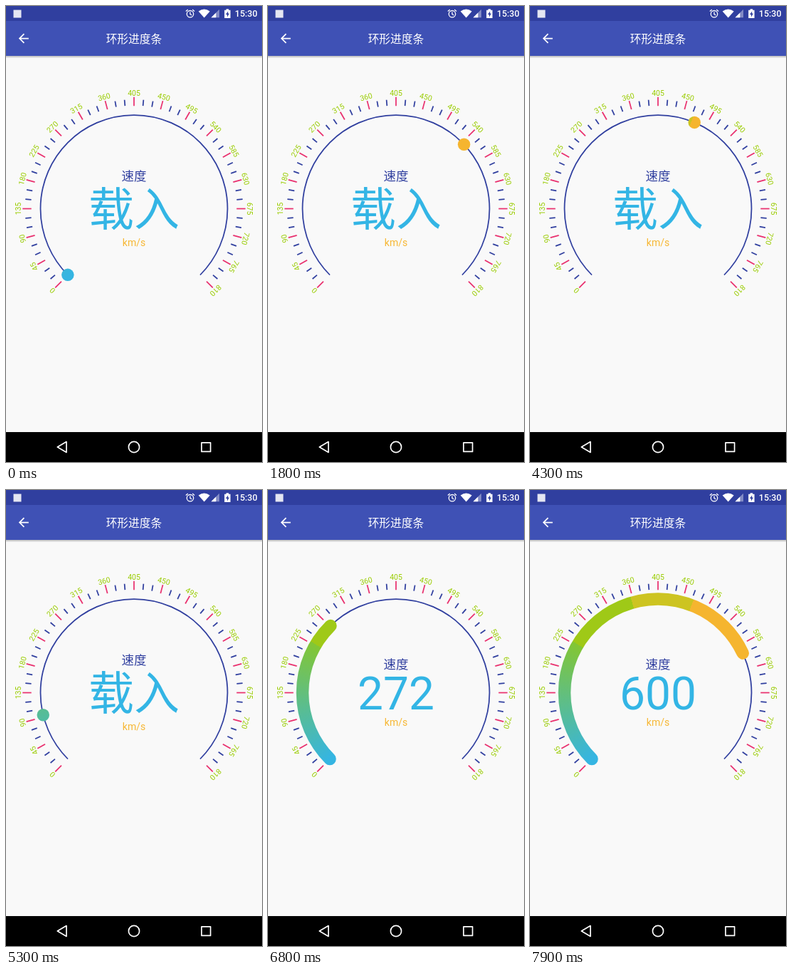
Write an HTML page with a canvas that moves like this. It is 360 px wide and 640 px high and loops after 8000 ms.

```html
<!DOCTYPE html>
<html lang="zh-CN">
<head>
<meta charset="utf-8">
<title>环形进度条</title>
<style>
  html, body { margin: 0; width: 100%; height: 100%; overflow: hidden; background: #f9f9f9; }
  svg, canvas { position: absolute; left: 0; top: 0; width: 360px; height: 640px; display: block; }
  text { font-family: Roboto, "Noto Sans CJK SC", "Noto Sans CJK", sans-serif; }
  .mid { text-anchor: middle; }
  .clock { font-size: 12.5px; font-weight: 500; fill: #fff; }
  .title { font-size: 15.75px; fill: #fff; }
  .label { font-size: 10.5px; fill: #99cc00; }
  .hint { font-size: 17.5px; fill: #303f9f; }
  .value { font-size: 64px; fill: #33b5e5; }
  .unit { font-size: 14px; fill: #f7b733; }
  .line { fill: none; stroke: #303f9f; stroke-width: 1.75; }
  .major { stroke: #e9306e; stroke-width: 1.75; }
  .minor { stroke: #303f9f; stroke-width: 1.75; }
  .nav { fill: none; stroke: #fff; stroke-width: 1.7; stroke-linejoin: round; }
</style>
</head>
<body>
<svg viewBox="0 0 360 640">
  <defs>
    <linearGradient id="shade" x2="0" y2="1">
      <stop offset="0" stop-color="#000" stop-opacity=".26"/>
      <stop offset="1" stop-color="#000" stop-opacity="0"/>
    </linearGradient>
  </defs>

  <rect width="360" height="640" fill="#f9f9f9"/>
  <rect y="70" width="360" height="3.5" fill="url(#shade)"/>
  <rect y="21" width="360" height="49" fill="#3f51b5"/>
  <rect width="360" height="21" fill="#303f9f"/>

  <rect x="10.5" y="5.5" width="11" height="11" fill="#e4e6f2"/>
  <g fill="none" stroke="#fff" stroke-width="1.3">
    <circle cx="259" cy="11.2" r="4.7"/>
    <path d="M259 8.4v3.1l2.2 1.4M252.9 7.6l2.9-2.5M265.1 7.6l-2.9-2.5"/>
  </g>
  <path d="M270.7 7.4Q278.7 1.6 286.7 7.4L278.7 16.6Z" fill="#fff"/>
  <path d="M288.5 16.3L300 4.8V16.3Z" fill="#fff" opacity=".4"/>
  <path d="M288.5 16.3L295.3 9.5V16.3Z" fill="#fff"/>
  <path d="M307.2 5.7h2.4V4.3h3.6v1.4h2.4v11.2h-8.4Z" fill="#fff"/>
  <path d="M312.2 7.3l-3.2 4.8h2v3.3l3-4.9h-1.8Z" fill="#303f9f"/>
  <text class="clock" x="321.8" y="15.4">15:30</text>

  <path transform="translate(14.3 35) scale(.875)" fill="#fff"
    d="M20 11H7.83l5.59-5.59L12 4l-8 8 8 8 1.41-1.41L7.83 13H20z"/>
  <text class="title mid" x="180" y="51.6">环形进度条</text>

  <path class="line" d="M87 377.5A131.5 131.5 0 1 1 273 377.5"/>
  <g id="dial" transform="translate(180 284.5)"></g>

  <text class="hint mid" id="hint" x="180">速度</text>
  <text class="value mid" id="value" x="180" y="308"></text>
  <text class="unit mid" id="unit" x="180">km/s</text>

  <rect y="598" width="360" height="42" fill="#000"/>
  <path class="nav" d="M72.3 619L85 611.6V626.4Z"/>
  <circle class="nav" cx="180" cy="619" r="7.6"/>
  <rect class="nav" x="275" y="612.8" width="12.6" height="12.6"/>
</svg>
<canvas id="arc"></canvas>

<script>
  const LOOP = 8000, STEP = 100;
  const CX = 180, CY = 284.5, R = 131.5, WIDTH = 17.5;
  const MAX = 810, SWEEP = 270, GOAL = 600;
  const SWING = 3000, LEAD = 37;         // loading dot: one way, head start
  const RISE_AT = 5860, RISE = 2000;     // counter: start, duration

  const byId = id => document.getElementById(id);
  const rad = deg => deg * Math.PI / 180;
  const ease = p => (1 - Math.cos(Math.PI * p)) / 2;

  function add(parent, tag, attrs, text = "") {
    const el = document.createElementNS("http://www.w3.org/2000/svg", tag);
    for (const key in attrs) el.setAttribute(key, attrs[key]);
    el.textContent = text;
    parent.append(el);
  }

  function buildDial() {
    for (let deg = 0; deg <= SWEEP; deg += 5) {
      const major = deg % 15 === 0;
      const transform = `rotate(${deg - 135})`;
      add(byId("dial"), "line", {
        class: major ? "major" : "minor", transform,
        y1: major ? -144.3 : -145, y2: major ? -156.7 : -153.3
      });
      if (major) add(byId("dial"), "text", { class: "label mid", transform, y: -158.6 }, deg * MAX / SWEEP);
    }
  }

  const canvas = byId("arc"), ctx = canvas.getContext("2d");
  const ratio = window.devicePixelRatio || 1;
  canvas.width = 360 * ratio;
  canvas.height = 640 * ratio;
  ctx.scale(ratio, ratio);

  const paint = ctx.createConicGradient(rad(135), CX, CY);
  [
    [0, "#35b5e2"], [76, "#83c633"],
    [76, "#9fc917"], [119, "#9fc917"],
    [119, "#cdc421"], [156, "#cdc421"],
    [156, "#f5b52f"], [205, "#f5b52f"],
    [262, "#f04040"], [315, "#f04040"],
    [315, "#35b5e2"], [360, "#35b5e2"]
  ].forEach(([deg, color]) => paint.addColorStop(deg / 360, color));
  ctx.strokeStyle = ctx.fillStyle = paint;
  ctx.lineWidth = WIDTH;
  ctx.lineCap = "round";

  function drawDot(deg) {
    const a = rad(135 + deg);
    ctx.beginPath();
    ctx.arc(CX + R * Math.cos(a), CY + R * Math.sin(a), WIDTH / 2, 0, 2 * Math.PI);
    ctx.fill();
  }

  function drawArc(deg) {
    ctx.beginPath();
    ctx.arc(CX, CY, R, rad(135), rad(135 + deg));
    ctx.stroke();
  }

  function setText(value, hintY, unitY) {
    byId("value").textContent = value;
    byId("hint").setAttribute("y", hintY);
    byId("unit").setAttribute("y", unitY);
  }

  function render(t) {
    ctx.clearRect(0, 0, 360, 640);
    if (t < RISE_AT) {
      setText("载入", 244.6, 337);
      drawDot(SWEEP * ease((t + LEAD) / SWING));
    } else {
      const value = GOAL * ease(Math.min(1, (t - RISE_AT) / RISE));
      setText(Math.round(value), 250.6, 331);
      drawArc(Math.max(0.01, value / MAX * SWEEP));
    }
  }

  function tick() {
    const t = performance.now() % LOOP;
    render(Math.floor(t / STEP) * STEP);
    requestAnimationFrame(tick);
  }

  buildDial();
  tick();
</script>
</body>
</html>
```
